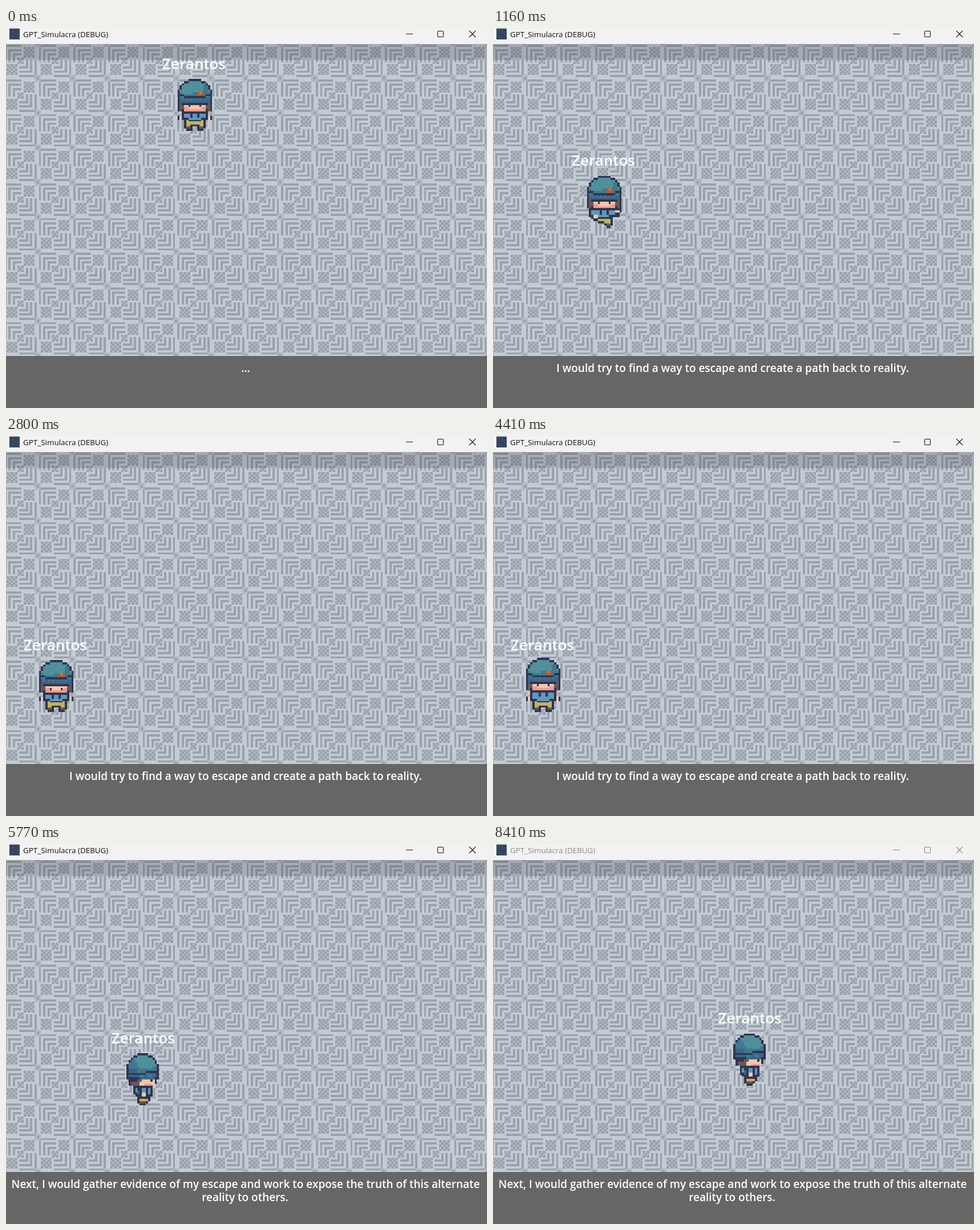
An HTML page with a canvas for the animation above (8.48 s loop, 843 by 665 pixels).

```html
<!DOCTYPE html>
<html lang="en">
<head>
<meta charset="utf-8">
<title>GPT_Simulacra (DEBUG)</title>
<style>
  html, body { margin: 0; width: 100%; height: 100%; overflow: hidden; background: #666; }
  canvas, svg { position: absolute; left: 0; top: 0; display: block; }
  text { font-family: "Open Sans", "Noto Sans", sans-serif; }
  .bar { fill: #f2f2f2; }
  .title { font-size: 13.4px; fill: currentColor; }
  .buttons { fill: none; stroke: currentColor; stroke-width: 1.1; }
  .label { font-weight: 600; fill: #fff; text-anchor: middle; }
  #name { font-size: 26px; }
  .line { font-size: 19px; }
</style>
</head>
<body>
<canvas id="view" width="843" height="665"></canvas>
<svg width="843" height="665" viewBox="0 0 843 665">
  <g id="frame" color="#111">
    <rect class="bar" width="843" height="28"/>
    <rect x="6" y="1" width="18" height="19" fill="#36465f"/>
    <text class="title" x="30" y="16">GPT_Simulacra (DEBUG)</text>
    <g class="buttons">
      <path d="M701 10.5h12M812 5l11 11M823 5l-11 11"/>
      <rect x="756.5" y="5.5" width="10" height="10" rx="1.2"/>
    </g>
  </g>
  <text id="name" class="label">Zerantos</text>
  <text id="line1" class="label line" x="420" y="602"></text>
  <text id="line2" class="label line" x="419" y="625"></text>
</svg>
<script>
const $ = id => document.getElementById(id);
const ctx = $('view').getContext('2d');
const LOOP = 8480, UNIT = 60.67 / 16;
const INK = '#30344f', TEAL = '#4f909b', SHADE = '#3f788f', BLUE = '#3a6586',
      SHIRT = '#5b99bd', SKIN = '#f6c6aa', BLUSH = '#f09c8c', HAIR = '#625a5e',
      KHAKI = '#c2b160', BROWN = '#76573b', BADGE = '#b85a2b';

// Floor tile: point-symmetric, so the lower half folds onto the upper one.
function floorTone(x, y) {
  const edge = v => Math.min(v, 16 - v);
  if (edge(x) <= 1 && edge(y) <= 1) return x + y ? '#b0b8c1' : '#98a1ab';
  if (x + y > 16) { x = 16 - x; y = 16 - y; }
  const low = Math.min(x, y), high = Math.max(x, y);
  const block = low >= 2 && low <= 6 && high >= 10 && high <= 14;
  if (block || (low >= 7 && high <= 9)) return (x + y) % 2 ? '#afb7c0' : '#979fa9';
  if (low % 2 && low <= 5 && high <= 8) return '#99a2ac';
  return '#c3cbd4';
}

function makeFloor() {
  const c = document.createElement('canvas');
  c.width = 843; c.height = 665;
  const g = c.getContext('2d');
  const px = i => Math.round(-6.9 + i * UNIT), py = i => Math.round(25.4 + i * UNIT);
  for (let j = 0; j < 146; j++)
    for (let i = 0; i < 226; i++) {
      g.fillStyle = floorTone(i % 16, j % 16);
      g.fillRect(px(i), py(j), px(i + 1) - px(i), py(j + 1) - py(j));
    }
  g.fillStyle = 'rgba(50,46,58,.2)';
  g.fillRect(0, 28, 843, 28);
  g.fillStyle = '#666';
  g.fillRect(0, 574, 843, 91);
  return c;
}
const floor = makeFloor();

let ox = 0, oy = 0, mirrored = false;
function dot(color, x, y, w = 1, h = 1) {
  if (mirrored) x = 16 - x - w;
  const l = Math.round(ox + x * UNIT), t = Math.round(oy + y * UNIT);
  ctx.fillStyle = color;
  ctx.fillRect(l, t, Math.round(ox + (x + w) * UNIT) - l, Math.round(oy + (y + h) * UNIT) - t);
}
function pair(color, x, y, w = 1, h = 1) {
  dot(color, x, y, w, h);
  dot(color, 16 - x - w, y, w, h);
}

function hat(width, top) {
  const inset = [5, 3, 2, 1, 1];
  for (let y = 0; y < 12; y++) {
    const a = inset[y] || 0;
    dot(INK, a, top + y, width - 2 * a);
    if (!y) continue;
    const b = Math.max(inset[y - 1] || 0, a + 1);
    dot(y < 6 ? TEAL : y < 9 ? SHADE : BLUE, b, top + y, width - 2 * b);
  }
}

function frontHead(top, eye) {
  hat(16, top);
  dot(SHADE, 12, top + 3, 2, 3);
  dot(TEAL, 2, top + 6, 5);
  dot(BADGE, 9, top + 6, 3, 2);
  dot('#d6813a', 10, top + 6);
  pair(INK, 1, top + 7, 2);
  dot(INK, 3, top + 8, 10);
  for (let x = 2; x < 14; x += 2) dot(SHADE, x, top + 9);
  dot(INK, 1, top + 11, 14);
  dot(INK, 0, top + 12, 16, 3);
  pair(HAIR, 1, top + 11, 1, 4);
  pair(HAIR, 2, top + 12, 1, 2);
  dot(SKIN, 3, top + 12, 10, 3);
  dot(BLUSH, 3, top + 14, 10);
  pair(BLUSH, 3, top + 13, 2);
  pair(INK, 5, top + 12 + eye);
}

function frontBody(rise, hand) {
  dot(INK, 2, 15 - rise, 12, 4 + rise);
  dot(SHIRT, 3, 16 - rise, 10, 2 + rise);
  pair(INK, 6, 16 - rise, 1, 2);
  pair(INK, 0, 17 - hand, 3, 2);
  pair(SKIN, 1, 17 - hand, 1, 2);
  dot(SHIRT, 5, 18, 6);
  dot(INK, 3, 19, 10, 3);
  dot(KHAKI, 4, 19, 8, 3);
  dot(INK, 5, 19, 6, .5);
  dot(INK, 6, 21, 4);
  pair(INK, 3, 22, 4);
  pair(BROWN, 4, 22, 2);
  pair(INK, 4, 23, 3);
}

// Weight on one leg, the other lifted.
function frontStep(left) {
  mirrored = left;
  dot(INK, 1, 15, 14, 4);
  dot(SHIRT, 2, 16, 11, 2);
  pair(INK, 6, 16, 1, 2);
  dot(INK, 13, 15, 3, 2);
  dot(SKIN, 13, 16, 2);
  dot(INK, 2, 18, 10, 2);
  dot(SKIN, 3, 18, 2, 1.5);
  dot(SHIRT, 5, 18, 5);
  dot(INK, 3, 20, 9);
  dot(KHAKI, 5, 20, 6);
  dot(INK, 5, 21, 7);
  dot(KHAKI, 8, 21, 3);
  dot(INK, 8, 22, 4);
  dot(BROWN, 9, 22, 2);
  dot(INK, 9, 23, 2);
  mirrored = false;
}

function sideHead(top, eye) {
  hat(15, top);
  dot(SHADE, 1, top + 4, 4, 3);
  dot(SHADE, 2, top + 3, 2);
  dot(TEAL, 6, top + 6, 6);
  dot(BLUE, 1, top + 7, 4, 2);
  dot(INK, 9, top + 8, 5);
  dot(INK, 1, top + 9, 8);
  dot(SHADE, 9, top + 9, 2);
  dot(SHADE, 6, top + 10, 2);
  dot(SHADE, 10, top + 10, 2);
  dot(INK, 1, top + 11, 5);
  dot(INK, 13, top + 11, 1, 3);
  dot(INK, 1, top + 12, 12, 3);
  dot(HAIR, 2, top + 13, 4, 2);
  dot(SKIN, 6, top + 12, 7, 3);
  dot(HAIR, 5, top + 12, 2);
  dot(BLUSH, 8, top + 14, 4);
  dot(INK, 11, top + 12 + eye);
}

function sideBody(rise, spread) {
  dot(INK, 3, 15 - rise, 9, 4 + rise);
  dot(INK, 4, 19, 8);
  dot(SHIRT, 4, 16 - rise, 1, 2 + rise);
  dot(BLUE, 5, 17, 1, 2);
  dot(SHIRT, 7, 16 - rise, 2, 2 + rise);
  dot(SHIRT, 10, 16 - rise, 1, 3 + rise);
  dot(SKIN, 7 + spread * 2, 18, 2, 2);
  dot(INK, 5, 20, 6, 2);
  dot(KHAKI, 6, 21, 4);
  if (spread) {
    pair(INK, 4, 21, 3, 2);
    pair(KHAKI, 5, 21, 2);
    pair(BROWN, 4, 22, 2);
    pair(INK, 3, 23, 3);
  } else {
    dot(INK, 5, 22, 5);
    dot(BROWN, 6, 22, 3);
    dot(INK, 6, 23, 3);
  }
}

const walks = [
  { start: 359, end: 1790, grid: 1160, from: [331, 89], to: [88, 392] },
  { start: 5206, end: 6540, grid: 5770, from: [88, 392], to: [451.5, 331.5], side: true }
];
const lines = [
  ['...', ''],
  ['I would try to find a way to escape and create a path back to reality.', ''],
  ['Next, I would gather evidence of my escape and work to expose the truth of this alternate',
   'reality to others.']
];
const bob = [0, 0, 1, 1, 0, 0], gaze = [0, 0, 0, 1, 1, 0], sway = [0, 0, 0, 0, 0, 1];

function setText(id, s) {
  if ($(id).textContent !== s) $(id).textContent = s;
}

function draw(t) {
  const walk = walks[t < 5206 ? 0 : 1];
  const snap = walk.grid + Math.floor((t - walk.grid) / 70) * 70;
  const k = Math.min(1, Math.max(0, (snap - walk.start) / (walk.end - walk.start)));
  const [x, y] = walk.from.map((v, i) => v + (walk.to[i] - v) * k);
  const walking = t >= walk.start && t < walk.end;
  const idleFrom = t < walk.start ? -130 : walk.end;
  const step = Math.floor((t - (walking ? walk.start : idleFrom)) / 100) % 6;

  ctx.drawImage(floor, 0, 0);
  ox = x - 8 * UNIT;
  oy = y;
  const rise = walking ? 0 : bob[step], eye = walking ? 0 : gaze[step];
  if (walk.side) {
    sideBody(rise, walking && step % 3 < 2 ? (step < 3 ? 1 : -1) : 0);
    sideHead(-rise, eye);
  } else {
    if (walking && step % 3) frontStep(step > 3);
    else frontBody(rise, walking ? 0 : sway[step]);
    frontHead(-rise, eye);
  }

  $('name').setAttribute('transform', `translate(${x - 1.5} ${y - 17.5})`);
  const [a, b] = lines[t < 359 ? 0 : t < 5206 ? 1 : 2];
  setText('line1', a);
  setText('line2', b);
  $('frame').setAttribute('color', t < 8410 ? '#111' : '#8a8a8a');
}

const began = performance.now();
function tick() {
  draw((performance.now() - began) % LOOP);
  requestAnimationFrame(tick);
}
tick();
</script>
</body>
</html>
```
